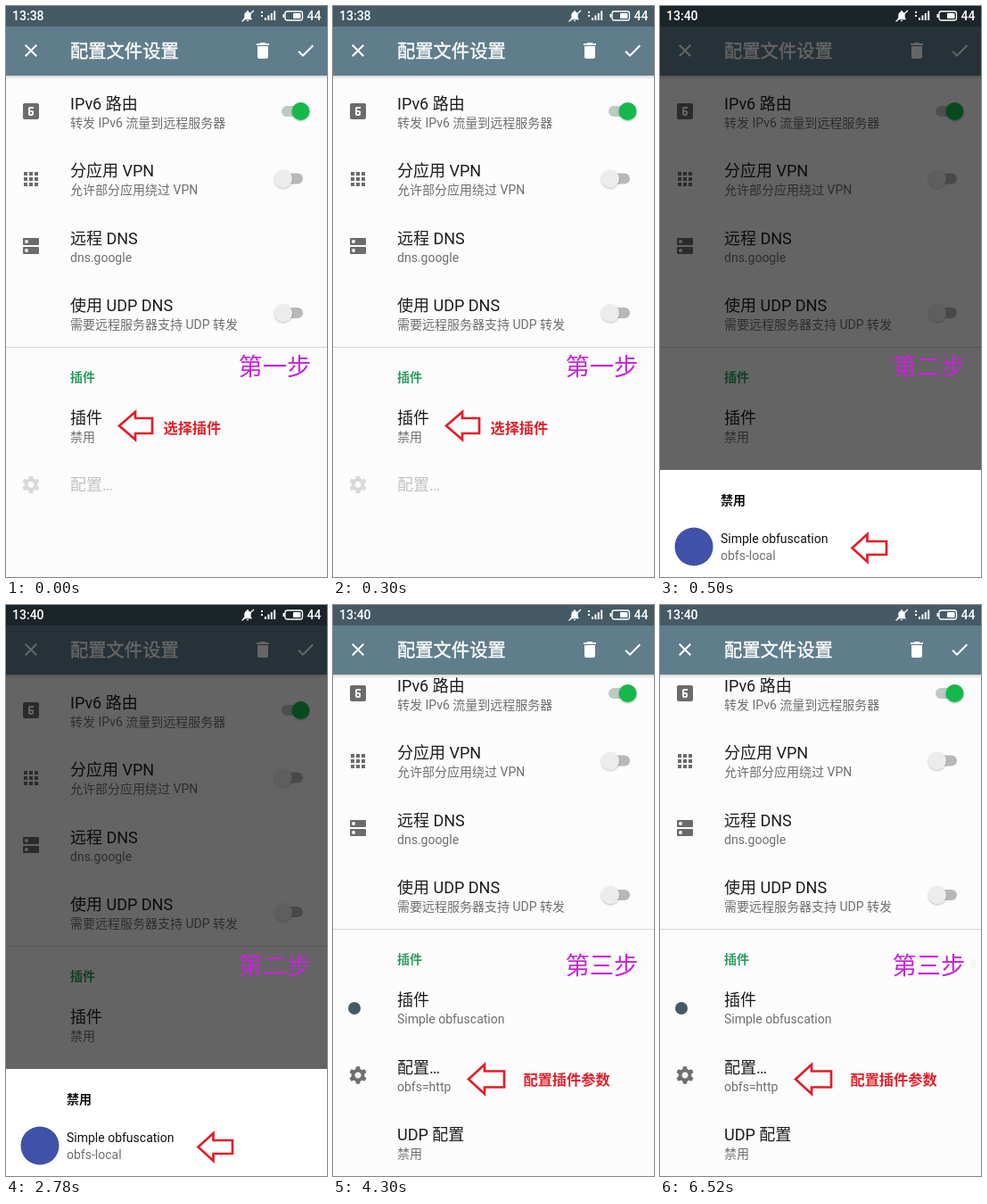
Write an HTML page that moves like this. It is 360 px wide and 640 px high and loops after 8000 ms.

```html
<!DOCTYPE html>
<html lang="zh-CN">
<head>
<meta charset="utf-8">
<title>插件设置步骤</title>
<style>
  html, body { margin: 0; width: 100%; height: 100%; overflow: hidden; }
  svg { display: block; width: 360px; height: 640px; }
  text { font-family: Roboto, "Noto Sans CJK SC", "Noto Sans CJK", sans-serif; white-space: pre; }
  .title { stroke: #fff; stroke-width: .4px; }
  .note { font-family: "Noto Sans CJK SC", "Noto Sans CJK", sans-serif; }
  .step { font-family: "Noto Sans CJK SC Light", "Noto Sans CJK SC", "Noto Sans CJK", sans-serif; }
</style>
</head>
<body>
<svg id="stage" viewBox="0 0 360 640" xmlns="http://www.w3.org/2000/svg"></svg>
<script>
const INK = '#1c1c1c', GREY = '#6e6e6e', PALE = '#c2c2c2', RED = '#e0202a';

// Icon outlines on a 24 x 24 grid
const ICONS = {
  close: 'M19 6.41 17.59 5 12 10.59 6.41 5 5 6.41 10.59 12 5 17.59 6.41 19 12 13.41 17.59 19 19 17.59 13.41 12z',
  bin: 'M6 19c0 1.1.9 2 2 2h8c1.1 0 2-.9 2-2V7H6zM19 4h-3.5l-1-1h-5l-1 1H5v2h14z',
  done: 'M9 16.2 4.8 12l-1.4 1.4L9 19 21 7l-1.4-1.4z',
  six: 'M11 15h2v-2h-2zm8-12H5c-1.1 0-2 .9-2 2v14c0 1.1.9 2 2 2h14c1.1 0 2-.9 2-2V5c0-1.1-.9-2-2-2zm-4 6h-4v2h2c1.1 0 2 .9 2 2v2c0 1.1-.9 2-2 2h-2c-1.1 0-2-.9-2-2V9c0-1.1.9-2 2-2h4z',
  apps: [4, 10, 16].flatMap(y => [4, 10, 16].map(x => `M${x} ${y}h4v4h-4z`)).join(''),
  dns: [3, 13].map(y => `M4 ${y}h16q1 0 1 1v6q0 1-1 1H4q-1 0-1-1v-6q0-1 1-1zm3 2a2 2 0 1 0 0 4 2 2 0 0 0 0-4z`).join(''),
  bell: 'M12 22a2 2 0 0 0 2-2h-4a2 2 0 0 0 2 2zm6-6v-5c0-3-1.6-5.6-4.5-6.3V4a1.5 1.5 0 0 0-3 0v.7C7.6 5.4 6 8 6 11v5l-2 2v1h16v-1z'
};

const text = (x, y, str, size, fill, weight = 400, cls = '') =>
  `<text x="${x}" y="${y}" font-size="${size}" fill="${fill}" font-weight="${weight}" class="${cls}">${str}</text>`;
const rect = (x, y, w, h, fill, rx = 0) =>
  `<rect x="${x}" y="${y}" width="${w}" height="${h}" fill="${fill}" rx="${rx}"/>`;
const disc = (x, y, r, fill, extra = '') =>
  `<circle cx="${x}" cy="${y}" r="${r}" fill="${fill}" ${extra}/>`;
const icon = (name, x, y, fill, scale = 1) =>
  `<path d="${ICONS[name]}" fill="${fill}" fill-rule="evenodd" transform="translate(${x} ${y}) scale(${scale}) translate(-12 -12)"/>`;

function gear(x, y, fill) {
  const teeth = [0, 60, 120].map(a =>
    `<path d="M-2-9.8h4l.8 4h-5.6zM-2 9.8h4l.8-4h-5.6z" transform="rotate(${a})"/>`).join('');
  return `<g transform="translate(${x} ${y})" fill="${fill}">${teeth}
    <circle r="5.4" fill="none" stroke="${fill}" stroke-width="3.8"/></g>`;
}

function toggle(y, on) {
  return rect(on ? 309 : 305, y - 6, 28, 12, on ? '#bccac1' : '#b8b8b8', 6) +
    disc(on ? 330.5 : 311, y, 10, on ? '#13b84c' : '#ececec', 'filter="url(#lift)"');
}

const row = (y, title, sub, color = INK) =>
  text(72, y + 6, title, 18, color) + (sub ? text(72, y + 26, sub, 14, GREY) : '');

function arrow(x, y, head, length, half, shaft) {
  return `<path d="M${x} ${y}l${head} ${-half}v${half - shaft}H${x + length}v${2 * shaft}H${x + head}v${half - shaft}z"
    fill="none" stroke="${RED}" stroke-width="2.7"/>`;
}

function statusBar(clock) {
  const bars = [0, 1, 2, 3].map(i => rect(290 + i * 3.4, 13 - i * 2.5, 2, 3 + i * 2.5, '#fff')).join('');
  return text(7, 16, clock, 14, '#fff', 500) +
    icon('bell', 271, 11, '#fff', .62) +
    '<path d="M264.5 17.5 278 5" stroke="#fff" stroke-width="1.3"/>' +
    bars + rect(286, 6, 2, 2, '#fff') + rect(286, 10, 2, 2, '#fff') +
    '<rect x="313" y="6" width="19.5" height="10" rx="2.5" fill="none" stroke="#fff" stroke-width="1.3"/>' +
    rect(310.5, 9, 2, 4, '#fff') + rect(322, 8, 8.5, 6, '#fff', 1) +
    text(337.5, 16, '44', 14, '#fff', 500);
}

function settings(chosen) {
  const plugin = chosen
    ? disc(24, 471, 7, '#455a64') + row(462, '插件', 'Simple obfuscation') +
      gear(28, 546, '#6f6f6f') + row(537.5, '配置…', 'obfs=http') + row(612.5, 'UDP 配置', '禁用')
    : row(462, '插件', '禁用') + gear(28, 536.5, '#d9d9d9') + row(537, '配置…', '', PALE);
  return `<g transform="translate(0 ${chosen ? -19 : 0})">` +
    icon('six', 28, 118, '#6b6b6b') + row(110, 'IPv6 路由', '转发 IPv6 流量到远程服务器') + toggle(118, true) +
    icon('apps', 28, 194, '#6b6b6b') + row(185, '分应用 VPN', '允许部分应用绕过 VPN') + toggle(193.5, false) +
    icon('dns', 28, 269, '#6b6b6b') + row(260.5, '远程 DNS', 'dns.google') +
    row(336, '使用 UDP DNS', '需要远程服务器支持 UDP 转发') + toggle(344, false) +
    rect(0, 382, 360, 1, '#d6d6d6') + text(72, 421, '插件', 14, '#2c9c5e', 700) + plugin + '</g>';
}

const header = rect(0, 78, 360, 4, 'url(#shade)') + rect(0, 0, 360, 78, '#607d8b') +
  rect(0, 0, 360, 23, '#455a64') + icon('close', 28, 50, '#fff') +
  text(72, 57.5, '配置文件设置', 20.3, '#fff', 500, 'title') +
  icon('bin', 288, 50, '#fff') + icon('done', 336, 50, '#fff');

const pluginSheet = rect(0, 0, 360, 640, 'rgba(0,0,0,.6)') + rect(0, 520, 360, 120, '#fff') +
  text(68, 559, '禁用', 14, '#111', 700) + disc(38, 606, 21.5, '#3f51a8') +
  text(68, 602, 'Simple obfuscation', 14, '#111') + text(68, 621, 'obfs-local', 14, GREY);

const stepNote = label => text(260.5, 414, label, 27.3, '#c725d8', 300, 'step');
const hint = (x, y, label) => text(x, y, label, 16.2, RED, 700, 'note');

const defs = `<defs>
  <linearGradient id="shade" x2="0" y2="1"><stop stop-color="#000" stop-opacity=".16"/><stop offset="1" stop-color="#000" stop-opacity="0"/></linearGradient>
  <filter id="lift" x="-30%" y="-30%" width="160%" height="160%"><feDropShadow dx="0" dy="1" stdDeviation="1" flood-opacity=".3"/></filter>
</defs>`;

const page = (chosen, clock, overlay, notes) =>
  defs + rect(0, 0, 360, 640, '#fcfcfc') + settings(chosen) + header + overlay + statusBar(clock) + notes;

const LOOP = 8000;
const steps = [
  { from: 0, art: page(false, '13:38', '', stepNote('第一步') + arrow(127, 470.5, 18, 37, 15.5, 8.5) + hint(176.5, 479, '选择插件')) },
  { from: 500, art: page(false, '13:40', pluginSheet, stepNote('第二步') + arrow(215.5, 607.5, 17, 38.5, 15.5, 7.5)) },
  { from: 4300, art: page(true, '13:40', '', stepNote('第三步') + arrow(152, 531.5, 18, 40, 16.5, 9) + hint(213.5, 538, '配置插件参数')) }
];

const stage = document.getElementById('stage');
const start = performance.now();
let shown;

function tick() {
  const time = (performance.now() - start) % LOOP;
  const step = steps.findLast(s => s.from <= time);
  if (step !== shown) {
    stage.innerHTML = step.art;
    shown = step;
  }
  requestAnimationFrame(tick);
}
tick();
</script>
</body>
</html>
```
